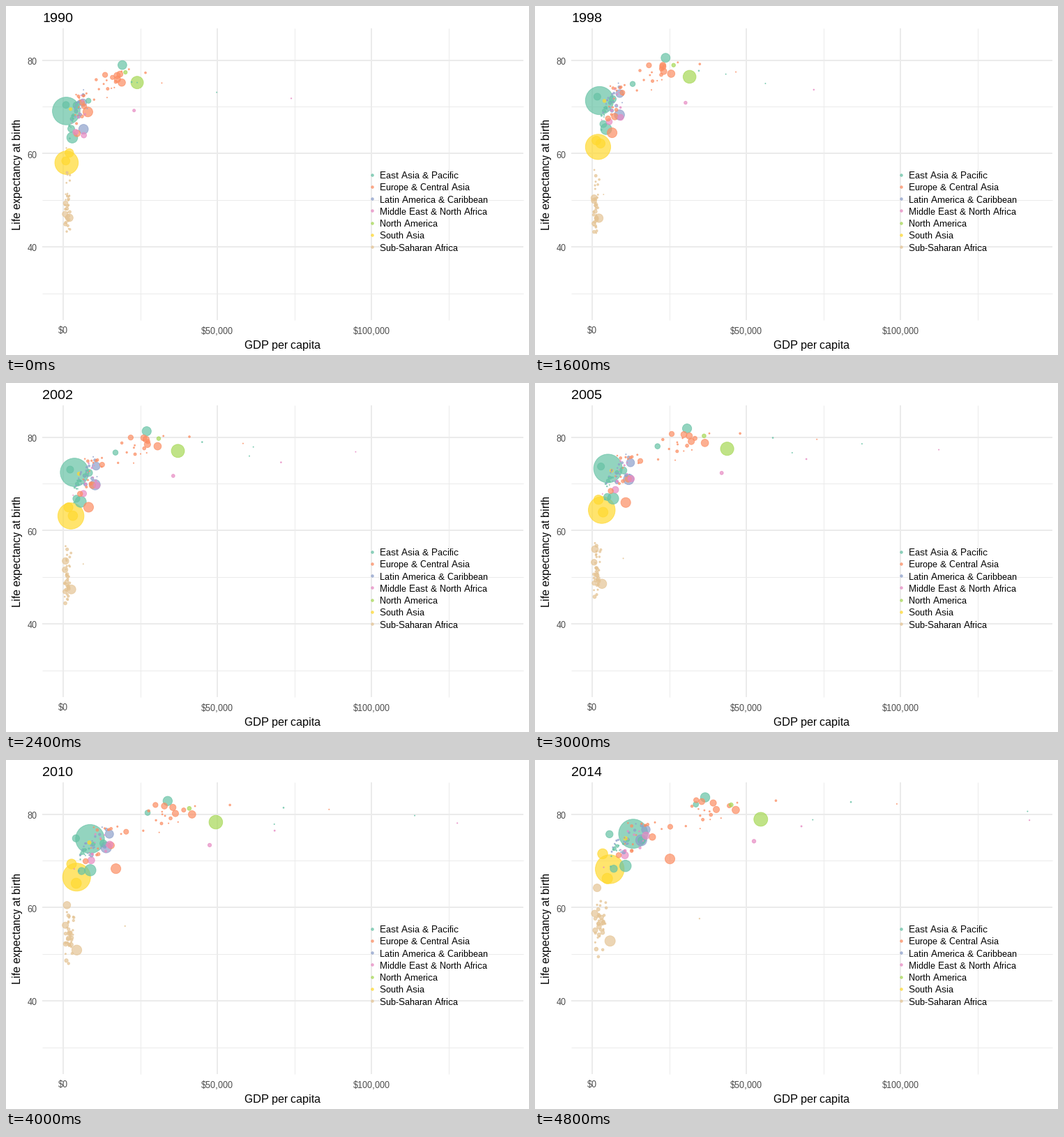
Animation of 750 by 500 pixels, one loop 5000 ms. Source, as a matplotlib script:

```python
import numpy as np
import matplotlib.pyplot as plt
from matplotlib.animation import FuncAnimation

W, H, DPI = 750, 500, 100
PX = 72 / DPI
START, END = 1990, 2014
YEARS = np.arange(START, END + 1)
T = (YEARS - START) / (END - START)
SLUMP = np.sin(np.pi * T ** .7)             # crisis of the nineties
BOOM = .12 * np.exp(-((T - .68) / .16) ** 2)  # rich economies before 2008

# name, colour, relative growth of the bubble radius over the loop
EAST, EURO, LATIN, MENA, NORTH, SOUTH, AFRICA = REGIONS = (
    ("East Asia & Pacific", "#66C2A5", .05),
    ("Europe & Central Asia", "#FC8D62", 0),
    ("Latin America & Caribbean", "#8DA0CB", .14),
    ("Middle East & North Africa", "#E78AC3", .26),
    ("North America", "#A6D854", .1),
    ("South Asia", "#FFD92F", .2),
    ("Sub-Saharan Africa", "#E5C494", .3),
)

plt.rcParams.update({"font.family": "Liberation Sans", "text.hinting": "native",
                     "text.hinting_factor": 1})
rng = np.random.default_rng(7)
bubbles = []


def x_of(gdp):
    return 82 + 4.42 * gdp


def y_of(life):
    return 77.6 + (80 - life) * 6.68


def add(region, radius, gdp0, gdp1, life0, life1, dip=0, since=START):
    """Grow from (gdp0, life0) to (gdp1, life1); dip is the life years lost midway."""
    pace = T + BOOM * min(1, gdp0 / 18)
    gdp = gdp0 * (gdp1 / gdp0) ** pace * np.exp(-.12 * dip * SLUMP)
    life = life0 + (life1 - life0) * T - dip * SLUMP
    r = np.where(YEARS >= since, radius * (1 + region[2] * (T - .5)), 0)
    bubbles.append((radius, region[1], x_of(gdp), y_of(life), r))


# The large countries
add(EAST, 20.8, 1, 13.3, 69.1, 75.8)
add(EAST, 8.5, 2.94, 10.8, 63.4, 68.9)
add(EAST, 7, 19.2, 36.6, 78.95, 83.6)
add(EAST, 5.5, 2.6, 7, 65.3, 68.3)
add(EAST, 5.5, .9, 5.6, 70.4, 75.7)
add(EAST, 5.5, 4.3, 16, 70.3, 74.4)
add(EAST, 4.2, 8.2, 33.6, 71.3, 82.1)
add(EURO, 7.5, 8, 25.2, 68.9, 70.4, dip=5)
add(EURO, 5.8, 19, 46.5, 75.2, 80.9)
add(EURO, 5, 17.5, 39.2, 76.7, 82.4)
add(EURO, 5, 17.6, 40.2, 75.9, 81)
add(EURO, 4.8, 18.4, 35.5, 77, 82.7)
add(EURO, 4.1, 13.6, 33.7, 76.85, 83)
add(EURO, 5.2, 4.5, 19.5, 64.3, 75.1)
add(EURO, 4.2, 6.8, 8.6, 70.1, 71.2, dip=3)
add(EURO, 4, 6.1, 25.3, 70.9, 77.3)
add(LATIN, 7.9, 6.6, 15.9, 65.2, 74.4)
add(LATIN, 6.2, 6.4, 17.4, 70.9, 76.7)
add(MENA, 5, 4, 10.6, 64.6, 71.2)
add(MENA, 5, 6.7, 17.4, 63.9, 75.4)
add(MENA, 2.8, 23, 52.4, 69.2, 74.2)
add(NORTH, 9.9, 24, 54.6, 75.2, 78.9)
add(NORTH, 3.2, 20.2, 45, 77.4, 82)
add(SOUTH, 19.2, 1.1, 5.7, 58, 68.2)
add(SOUTH, 7.3, 2, 4.9, 60.1, 66.2)
add(SOUTH, 7, .85, 3.4, 58.4, 71.5)
add(SOUTH, 2.8, 2.4, 10.8, 69.5, 74.8)
add(AFRICA, 6.9, 2, 5.8, 46.2, 52.8, dip=2.3)
add(AFRICA, 5.2, .6, 1.6, 47, 64.2, dip=2.3)
add(AFRICA, 4.5, .8, .8, 49.3, 58.7, dip=2.6)

# Small and very rich
add(EAST, 1, 49.8, 71.5, 73.1, 78.8)
add(EAST, 1, 24, 140.7, 75.2, 80.6)
add(EAST, 1.3, 22.2, 83.7, 75.3, 82.6)
add(EURO, 1, 32, 98.6, 75.1, 82.2)
add(EURO, 1.8, 26.7, 59.5, 77.3, 82.9)
add(MENA, 1.3, 74, 67.9, 71.8, 77.4)
add(MENA, 1, 60, 141.6, 75, 78.7, since=2000)
add(AFRICA, 1, 1.2, 34.8, 48, 57.6)


def small_radius():
    return min(.9 + rng.exponential(.7), 3.5)


# Everyone else: life expectancy follows the logarithm of income.
# region, count, typical income, growth factor
for region, count, typical, growth in (
        (EAST, 12, 3.2, 3), (EURO, 14, 5.5, 2.7), (EURO, 12, 17, 2.5),
        (LATIN, 20, 5, 2.3), (MENA, 10, 5, 2.2)):
    for _ in range(count):
        gdp0 = typical * np.exp(rng.normal(0, .3))
        gdp1 = gdp0 * growth * np.exp(rng.normal(0, .15))
        off = rng.normal(0, 1.5)
        life0, life1 = (62.5 + 4.7 * np.log(g) + off for g in (gdp0, gdp1))
        add(region, small_radius(), gdp0, gdp1, life0, life1 + .7)
for _ in range(36):
    gdp0, life0 = rng.uniform(.5, 2.2), rng.normal(51, 4.5)
    add(AFRICA, small_radius() + .4, gdp0, gdp0 * rng.uniform(1.3, 2.3),
        life0, 54 + .55 * (life0 - 45) + rng.normal(0, 2), dip=rng.uniform(1, 5))

bubbles.sort(key=lambda b: -b[0])
colors = [b[1] for b in bubbles]
xs, ys, radii = (np.array([b[k] for b in bubbles]) for k in (2, 3, 4))


def area(r):
    return (np.maximum(2 * r - .9, 0) * PX) ** 2


fig = plt.figure(figsize=(W / DPI, H / DPI), dpi=DPI, facecolor="white")
ax = fig.add_axes([0, 0, 1, 1])
ax.set(xlim=(0, W), ylim=(H, 0))
ax.axis("off")


def label(x, y, text, size, color="black", **kw):
    return ax.text(x, y, text, fontsize=size * PX, color=color, **kw)


def grid(gdps, lives, width):
    style = dict(colors="#EBEBEB", linewidths=width * PX, zorder=1)
    ax.vlines([x_of(g) for g in gdps], 32, 450, **style)
    ax.hlines([y_of(v) for v in lives], 52, 742, **style)


grid((25, 75, 125), (70, 50, 30), 1)
grid((0, 50, 100), (80, 60, 40), 2)
for gdp in (0, 50, 100):
    label(x_of(gdp), 469.5, f"${gdp * 1000:,}", 13, "#4D4D4D", ha="center")
for life in (80, 60, 40):
    label(44.8, y_of(life) + 6.4, str(life), 13, "#4D4D4D", ha="right")
label(397, 491, "GDP per capita", 16, ha="center")
label(16.5, 241.5, "Life expectancy at birth", 16, rotation=90, ha="center", va="center")
title = label(52, 23, "", 19)

dot_style = dict(alpha=.7, linewidths=.94 * PX)
for row, (name, color, _) in enumerate(REGIONS):
    y = 241.5 + 17.28 * row
    ax.scatter(525, y, s=area(2.2), c=color, edgecolors=color, zorder=4, **dot_style)
    label(536, y + 5.5, name, 13, zorder=5)

dots = ax.scatter(xs[:, 0], ys[:, 0], facecolors=colors, edgecolors=colors,
                  zorder=3, **dot_style)


def update(i):
    shown = radii[:, i] > 0
    title.set_text(str(YEARS[i]))
    dots.set_offsets(np.column_stack([np.where(shown, xs[:, i], -W), ys[:, i]]))
    dots.set_sizes(area(radii[:, i]))
    return title, dots


anim = FuncAnimation(fig, update, frames=len(YEARS), interval=200, repeat=True, repeat_delay=0)
plt.show()
```
